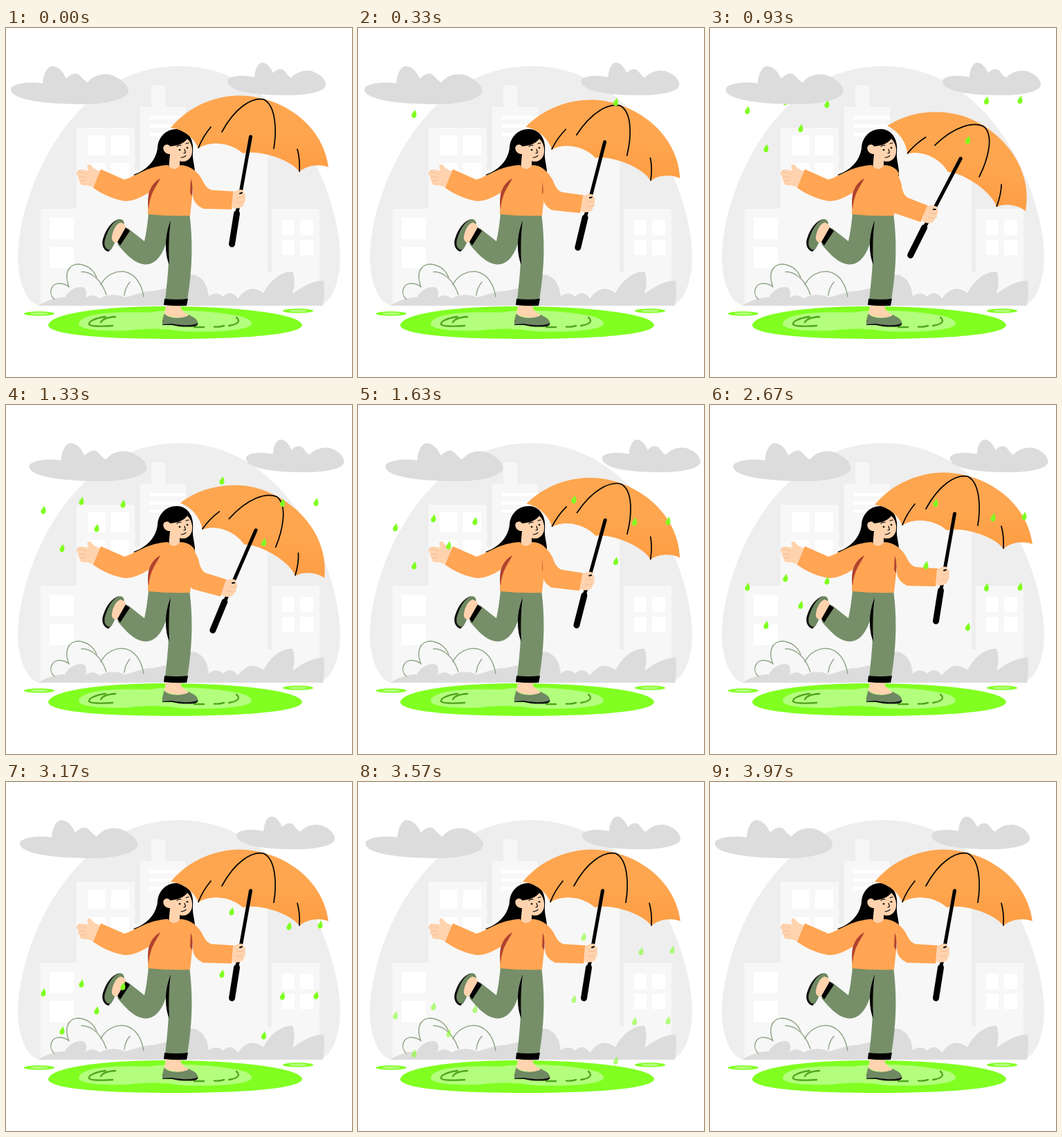
Animation, 500 px wide and 504 px high, one loop 4010 ms. Source, as an HTML page:

```html
<!DOCTYPE html>
<html lang="en">
<head>
<meta charset="utf-8">
<title>Walk in the rain</title>
<style>
html, body { margin: 0; width: 100%; height: 100%; overflow: hidden; background: #fff; }
svg { display: block; width: 500px; height: 504px; }
.line { fill: none; stroke-linecap: round; stroke-linejoin: round; }
</style>
</head>
<body>
<svg viewBox="0 0 500 504">
  <linearGradient id="cloth" x2="0" y2="1">
    <stop offset=".5" stop-color="#fda64f"/>
    <stop offset="1" stop-color="#ff9d43"/>
  </linearGradient>

  <!-- city -->
  <path fill="#eee" d="M50 401C30 399 17 368 17 328C20 232 95 55 250 55C405 55 480 232 483 328C483 368 470 399 450 401Z"/>
  <path fill="#f7f7f7" d="M50 401V261H102V144H186V401ZM194 401V114H210V83H230V114H260V150H378V353H384V261H453V401ZM186 205h8v196h-8z"/>
  <path fill="#fff" d="M118 155h26v29h-26zM152 155h26v29h-26zM118 195h26v28h-26zM152 195h26v28h-26zM208 127h52v5h-52zM208 139h52v5h-52zM208 151h52v5h-52zM63 274h35v31H63zM63 316h35v31H63zM399 277h18v22h-18zM425 277h19v22h-19zM399 306h18v22h-18zM425 306h19v22h-19z"/>

  <!-- bushes -->
  <path fill="#dcdcdc" d="M46 401C58 394 70 389 85 389C90 378 107 370 114 376C117 381 116 386 115 390C122 385 130 385 135 391C143 385 160 383 172 389C185 386 200 379 212 380L235 375L262 357C276 353 291 363 293 388C300 381 309 383 314 388C320 380 330 382 335 391C342 381 352 374 363 378C368 380 370 381 372 383C381 365 398 351 414 352C418 361 417 374 414 384C426 375 443 364 459 365C461 376 460 390 458 401Z"/>
  <g class="line" stroke="#93a78a" stroke-width="1.5">
    <path d="M70 392C60 383 65 367 80 369Q87 370 91 374C84 356 89 342 104 341C119 342 127 351 131 360"/>
    <path d="M109 352C125 352 138 365 145 385M137 371C144 356 160 350 172 352C188 356 196 371 199 388M179 367Q172 375 171 386"/>
  </g>

  <!-- puddles -->
  <g fill="#80ff20">
    <path d="M61 429C64 412 140 402 230 402C330 402 425 412 428 429C426 443 340 449 245 449C150 449 62 444 61 429Z"/>
    <ellipse cx="48" cy="412.500" rx="22" ry="3.200"/>
    <ellipse cx="422" cy="408.500" rx="22" ry="3.200"/>
  </g>
  <g fill="#b3ff7d">
    <path d="M105 427C108 413 150 409 205 411C240 405 300 409 325 414C345 416 356 422 355 428C350 437 300 440 255 438C220 433 200 434 175 437C140 438 105 436 105 427Z"/>
    <ellipse cx="48" cy="412.500" rx="13" ry="1.800"/>
    <ellipse cx="422" cy="408.500" rx="13" ry="1.800"/>
  </g>
  <path class="line" stroke="#4fa51c" stroke-width="2.400" d="M144 417C128 419 119 424 120 428Q123 432 154 430M158 417Q141 418 137 425M272 432H286M301 431.500Q309 432 315 430M322 430C334 428 340 424 333 418"/>

  <!-- feet and legs -->
  <path fill="#111" d="M226 422V429H240Q250 432 268 431.500Q279 431 277 425ZM163 276C152 280 145 290 141 302C137 311 140 321 148 323L153 318Z"/>
  <path fill="#6f8962" d="M229 412C233 420 255 421 264 414C270 417 278 421 277 426C272 430 255 430 240 427L226 428Q226 418 229 412ZM164 276C171 276 173 283 168 288L158 308C155 316 152 321 148 320C142 318 141 310 144 303C148 290 155 279 164 276Z"/>
  <path fill="#ffd3ae" d="M231 399H251C253 408 259 412 264 415C255 420 239 419 229 413ZM166 281C172 283 175 287 173 291L163 309C158 312 152 308 153 302C154 293 159 282 166 281Z"/>
  <path fill="#768f69" d="M206 267H265C270 305 270 345 262 393H230C233 365 236 340 235 317L234 302C227 328 217 341 202 341.500C187 341 174 328 161 312L176 289L200 308Q204 290 206 267Z"/>
  <path fill="#000" d="M238 278C235 300 235 318 236 342C229 325 229 300 238 278ZM229 391Q246 393 263 391L261 401Q245 402 228 400ZM173 288L179 293L165 314L161 309Z"/>

  <!-- head -->
  <path fill="#000" d="M248 146C232 145 220 157 219 173C217 190 205 205 184 212Q203 222 230 214H273C274 201 269 191 270 180C272 162 264 147 248 146Z"/>
  <path fill="#ffd3ae" d="M237 171C248 170 257 167 262 160C268 165 271 176 268 184C264 193 256 194 251 192V204Q242 209 235 204L237 182C229 183 224 172 230 169Q235 167 237 171Z"/>
  <path class="line" stroke="#000" stroke-width="1.100" d="M247 171Q250 168.500 253 169.500M260 167L264 166M253 187Q258 187 260 184M258 175L259.500 180L257 181"/>
  <circle cx="251" cy="176" r="1.300"/>
  <circle cx="262" cy="173" r="1.300"/>

  <!-- sweater and free hand -->
  <path fill="#ffd3ae" d="M136 207L129 231L117 227C109 228 105 225 107 221Q102 219 105 215Q99 210 104 206C107 203 113 205 119 206C116 199 118 196 122 197Q126 204 136 207Z"/>
  <path class="line" stroke="#f0b792" stroke-width=".8" d="M104 207L116 211M105 214L115 216M107 221L116 220"/>
  <path fill="#ffa553" d="M234 198Q242 209 252 198C262 198 270 203 273 210Q269 225 269 243L266 271Q235 272 205 269L206 238C193 246 183 250 172 250C157 248 141 241 126 231L137 204L171 219C188 214 205 199 234 198Z"/>
  <path fill="#b0432f" d="M223 217C218 229 209 235 206 262C203 240 208 226 223 217ZM267 217C270 224 270 234 269 243L266 238Z"/>

  <!-- umbrella arm -->
  <g id="arm">
    <path fill="url(#cloth)" d="M238 144C262 115 300 97.500 338 97.500C395 98 458 137 466 201C454 196 434 198 424 208C413 190 365 175 342 181C325 165 295 162 278 174C272 158 255 146 238 144Z"/>
    <path class="line" stroke="#000" stroke-width="1.700" d="M296 143Q285 156 278 173M312 150C331 115 355 100 372 103C391 112 391 150 387 174M421 175Q425 189 424 207"/>
    <path class="line" stroke="#000" stroke-width="5" d="M353.500 157L334 266"/>
    <path class="line" stroke="#000" stroke-width="9" d="M333.500 268L326.500 312"/>
    <path fill="#ffa553" d="M255 199C268 200 276 207 283 218C287 227 291 232 297 234L329 236L326 262L285 261C276 257 271 250 270 243Q271 229 267 217Z"/>
    <path fill="#ffd3ae" d="M328 237L335 234Q344 232 343 237Q348 239 345 245Q348 249 344 252Q344 258 339 259Q334 262 326 259Z"/>
    <path class="line" stroke="#f0b792" stroke-width=".8" d="M334 245L345 244M334 252L344 251"/>
    <path class="line" stroke="#000" stroke-width="2" d="M338 239L341 238"/>
  </g>

  <g id="rain" fill="#80ff20"></g>

  <g id="clouds" fill="#dcdcdc">
    <path d="M7 88C9 80 35 77 53 80C54 65 60 55 67 55C78 56 83 65 87 73C95 65 103 63 108 70Q112 75 118 79C127 66 148 63 161 72C170 77 178 85 177 92C174 104 140 111 105 110C60 110 5 104 7 88Z"/>
    <path d="M320 76C322 69 343 67 359 71C360 58 365 50 370 50C378 50 383 58 386 65C393 58 400 58 404 64Q407 69 412 72C421 62 436 59 446 64C455 67 463 76 462 83C460 93 430 98 400 97C360 97 320 92 320 76Z"/>
  </g>
</svg>
<script>
const LOOP = 4010;
const get = id => document.getElementById(id);
const arm = get("arm"), rain = get("rain"), clouds = get("clouds");
const clamp = v => Math.max(0, Math.min(1, v));
const swing = (t, period) => (1 - Math.cos(2 * Math.PI * t / period)) / 2;

// x and height at the start of the loop
const drops = [
  [81, 97], [131, 68], [54, 42], [109, 29], [169, 33],
  [372.5, 77], [399.5, 20], [448, 19], [312, -12], [326, -102], [409, -81], [454, -83]
].map(([x, y]) => {
  const el = document.createElementNS("http://www.w3.org/2000/svg", "path");
  el.setAttribute("d", "M1-6.500C3-3 4 0 3.300 2.800C2 6.500-3 6.500-3.500 2.500C-4-1 0-3 1-6.500Z");
  rain.append(el);
  return { el, x, y, speed: x < 200 ? .0827 : .0912 };
});

function draw(now) {
  const t = now % LOOP;
  clouds.setAttribute("transform", `translate(${35.5 * swing(t, 4000)} 0)`);
  const tilt = t < 2000 ? 17.8 * swing(t, 2000) : 0;
  arm.setAttribute("transform", `rotate(${tilt} 256 201)`);
  rain.setAttribute("opacity", clamp((3950 - t) / 650));
  for (const { el, x, y, speed } of drops) {
    const fall = y + speed * t;
    el.setAttribute("transform", `translate(${x} ${fall})`);
    el.setAttribute("opacity", clamp((fall - 88) / 8));
  }
  requestAnimationFrame(draw);
}
requestAnimationFrame(draw);
</script>
</body>
</html>
```
